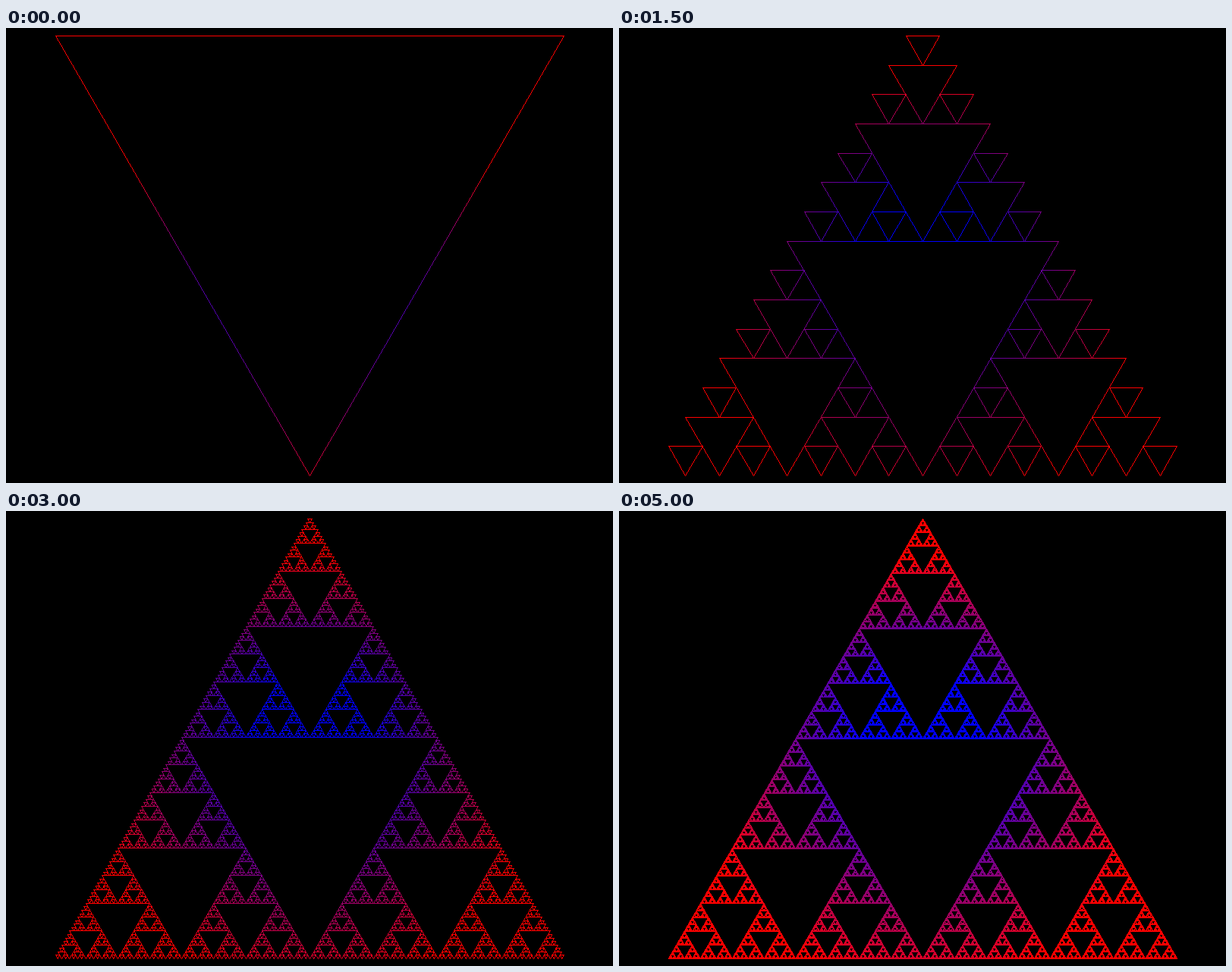
Recreate the animation shown at these times as an HTML page with a canvas. Size 800 by 600 pixels, loop 5500 ms.

```html
<!DOCTYPE html>
<html lang="en">
<head>
<meta charset="utf-8">
<title>Sierpinski triangles</title>
<style>
  html, body { margin: 0; width: 100%; height: 100%; overflow: hidden; background: #000; }
  canvas { display: block; }
</style>
</head>
<body>
<canvas id="stage" width="800" height="600"></canvas>
<script>
const W = 800, H = 600;
const BOX = { left: 65, top: 10, width: 670, height: 580 };
const STEPS = 11, STEP_MS = 500;
const ctx = document.getElementById('stage').getContext('2d');

// Hard-edged one-pixel line, written into the alpha channel
function line(data, x0, y0, x1, y1) {
  const dx = x1 - x0, dy = y1 - y0;
  const n = Math.max(Math.abs(dx), Math.abs(dy), 1);
  for (let i = 0; i <= n; i++) {
    const x = Math.round(x0 + dx * i / n);
    const y = Math.round(y0 + dy * i / n);
    data[(y * W + x) * 4 + 3] = 255;
  }
}

// Inverted triangle standing on (x, y), with a smaller copy on each side and one on top
function grow(data, x, y, depth, unitW, unitH) {
  const size = 2 ** depth;
  const half = size * unitW / 2;
  const top = y - size * unitH;
  const l = Math.round(x - half), r = Math.round(x + half), t = Math.round(top);
  const tipX = Math.round(x), tipY = Math.round(y);
  line(data, l, t, r, t);
  line(data, l, t, tipX, tipY);
  line(data, r, t, tipX, tipY);
  if (depth === 0) return;
  grow(data, x - half, y, depth - 1, unitW, unitH);
  grow(data, x + half, y, depth - 1, unitW, unitH);
  grow(data, x, top, depth - 1, unitW, unitH);
}

function makeLayer(depth) {
  const layer = document.createElement('canvas');
  layer.width = W;
  layer.height = H;
  const c = layer.getContext('2d');
  const image = c.createImageData(W, H);
  const units = 2 ** (depth + 1) - 1;
  grow(image.data, BOX.left + BOX.width / 2, BOX.top + BOX.height,
       depth, BOX.width / units, BOX.height / units);
  c.putImageData(image, 0, 0);

  const glow = c.createRadialGradient(400, 290, 75, 400, 346, 284);
  glow.addColorStop(0, '#00f');
  glow.addColorStop(1, '#f00');
  c.globalCompositeOperation = 'source-in';
  c.fillStyle = glow;
  c.fillRect(0, 0, W, H);
  return layer;
}

const layers = Array.from({ length: STEPS }, (_, depth) => makeLayer(depth));
const start = performance.now();
let shown = -1;

function draw() {
  const step = Math.floor((performance.now() - start) / STEP_MS) % STEPS;
  if (step !== shown) {
    ctx.fillStyle = '#000';
    ctx.fillRect(0, 0, W, H);
    ctx.drawImage(layers[step], 0, 0);
    shown = step;
  }
  requestAnimationFrame(draw);
}
draw();
</script>
</body>
</html>
```
